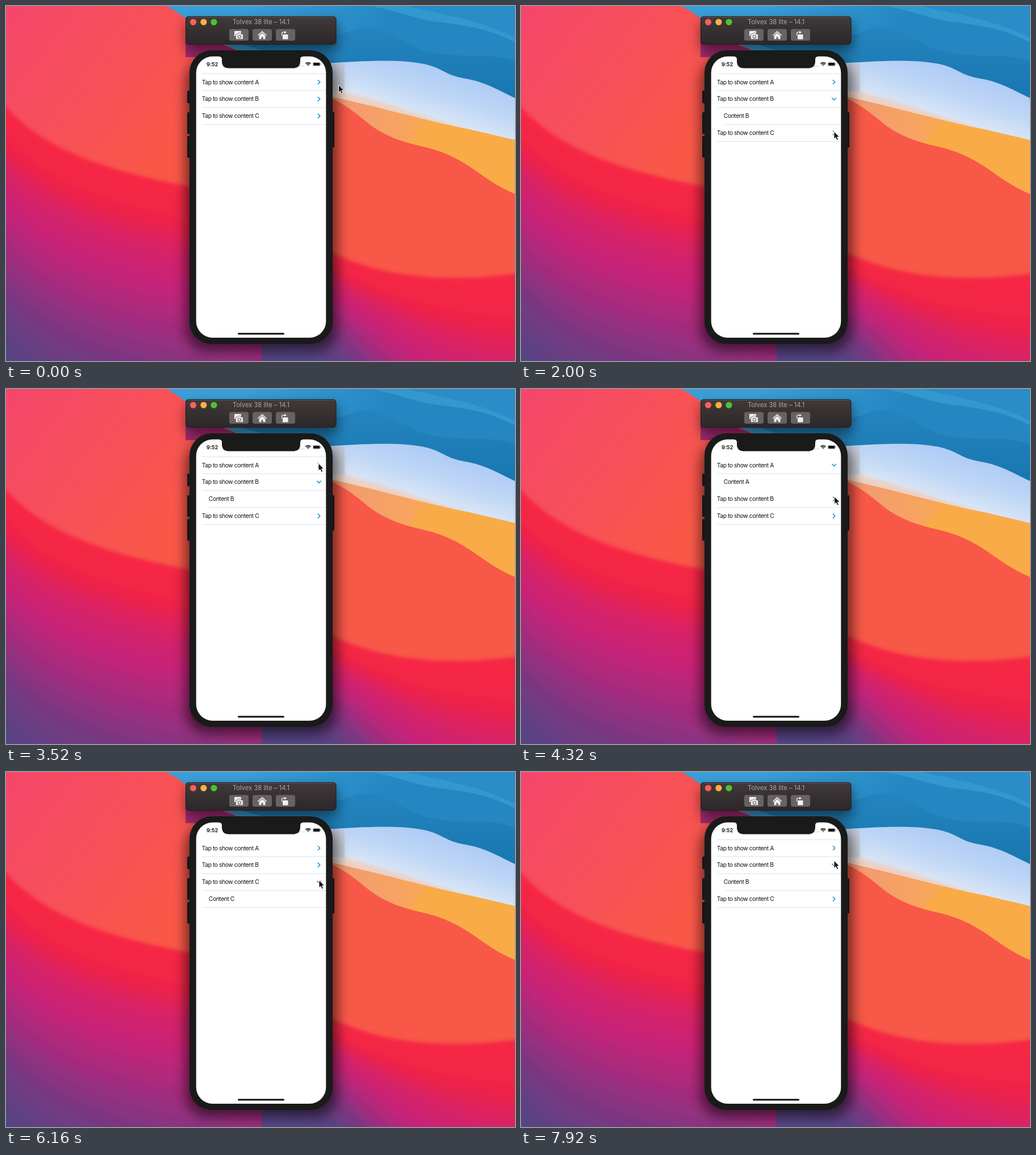
An HTML page that plays this animation: 896 by 625 pixels, repeating every 8000 ms.

```html
<!DOCTYPE html>
<html lang="en">
<head>
<meta charset="utf-8">
<title>Expandable list</title>
<style>
  html, body { margin: 0; width: 100%; height: 100%; overflow: hidden; background: #f85848; }
  svg { display: block; width: 896px; height: 625px; }
  text { font-family: Inter, Roboto, sans-serif; }
  .row { font-size: 10.3px; letter-spacing: -.42px; fill: #111; }
  .line { stroke: #d5e4ea; stroke-width: 1; }
  .chev { fill: none; stroke: #1c8cc8; stroke-width: 1.5; stroke-linecap: round; stroke-linejoin: round; }
</style>
</head>
<body>
<svg id="stage" viewBox="0 0 896 625" xmlns="http://www.w3.org/2000/svg">
  <defs>
    <linearGradient id="warm" x1="0" y1="0" x2="300" y2="230" gradientUnits="userSpaceOnUse">
      <stop offset="0" stop-color="#f5466b"/><stop offset=".5" stop-color="#f74f5b"/><stop offset="1" stop-color="#f95848"/>
    </linearGradient>
    <linearGradient id="sky" x1="420" y1="0" x2="620" y2="120" gradientUnits="userSpaceOnUse">
      <stop offset="0" stop-color="#3a9fd8"/><stop offset="1" stop-color="#2487c2"/>
    </linearGradient>
    <linearGradient id="deep" x1="0" y1="30" x2="0" y2="160" gradientUnits="userSpaceOnUse">
      <stop offset="0" stop-color="#2485c0"/><stop offset="1" stop-color="#1977b0"/>
    </linearGradient>
    <linearGradient id="mist" x1="700" y1="96" x2="670" y2="195" gradientUnits="userSpaceOnUse">
      <stop offset="0" stop-color="#b0cdf5"/><stop offset=".4" stop-color="#bfd6f6"/><stop offset="1" stop-color="#e6eef6"/>
    </linearGradient>
    <linearGradient id="sand" x1="590" y1="0" x2="760" y2="0" gradientUnits="userSpaceOnUse">
      <stop offset="0" stop-color="#f39a72"/><stop offset=".7" stop-color="#f7a55e"/><stop offset="1" stop-color="#f9ab48"/>
    </linearGradient>
    <linearGradient id="bar" x1="0" y1="18" x2="0" y2="68" gradientUnits="userSpaceOnUse">
      <stop offset="0" stop-color="#413a3b"/><stop offset=".4" stop-color="#383233"/><stop offset="1" stop-color="#2b2728"/>
    </linearGradient>
    <filter id="soft" x="-10%" y="-10%" width="120%" height="120%"><feGaussianBlur stdDeviation="3"/></filter>
    <filter id="shade" x="-30%" y="-30%" width="160%" height="160%"><feGaussianBlur stdDeviation="11"/></filter>
    <clipPath id="leftHalf"><rect width="450" height="625"/></clipPath>
    <clipPath id="rightHalf"><rect x="450" width="446" height="625"/></clipPath>
  </defs>

  <!-- wallpaper -->
  <rect width="896" height="625" fill="url(#warm)"/>
  <path d="M282 0C300 9 310 16 330 34C350 52 380 68 420 82C480 102 540 140 575 165L896 260V0Z" fill="url(#sky)"/>
  <path d="M316 20C336 42 360 62 402 76L420 90H316Z" fill="#a52a72"/>
  <path d="M390 60C470 74 560 62 610 42C660 26 690 62 730 76C790 97 850 78 896 98V175L575 115Z" fill="url(#deep)"/>
  <path d="M640 0C690 8 715 22 760 28C810 34 850 40 896 64V0Z" fill="#3398d0"/>
  <path d="M705 0C760 14 830 22 896 56V0Z" fill="#2a8dc8"/>
  <path d="M560 101C620 97 690 93 730 101C770 108 770 122 810 128C845 134 870 150 896 162V240L700 225L560 170Z" fill="url(#mist)"/>
  <path d="M575 101H596V152L575 150Z" fill="#c3c5cd" opacity=".7"/>
  <path d="M575 148C650 160 730 195 815 217L700 214L575 178Z" fill="#f2c9b4" opacity=".75" filter="url(#soft)"/>
  <path d="M575 160C650 176 730 200 815 217L896 236V340L700 270L575 200Z" fill="url(#sand)"/>
  <path d="M738 208L815 217L896 236V340L700 250Z" fill="#f9ab47"/>
  <path d="M560 158C590 168 610 184 632 202C665 230 700 240 740 249C815 268 835 306 896 331V625H560Z" fill="#f85848"/>
  <g clip-path="url(#leftHalf)"><g id="left" filter="url(#soft)"></g></g>
  <g clip-path="url(#rightHalf)"><g id="right" filter="url(#soft)"></g></g>

  <!-- shadows -->
  <g filter="url(#shade)">
    <rect x="316" y="92" width="268" height="516" rx="40" opacity=".55"/>
    <rect x="316" y="28" width="267" height="52" rx="6" opacity=".5"/>
  </g>

  <!-- simulator bar -->
  <rect x="316.5" y="18.5" width="264.5" height="49" rx="5" fill="url(#bar)" stroke="#211d1e"/>
  <path d="M321 19.5H577" stroke="#6a6263" stroke-width=".8"/>
  <circle cx="329.5" cy="28.3" r="5.6" fill="#fb5f57"/>
  <circle cx="347.9" cy="28.3" r="5.6" fill="#fdb040"/>
  <circle cx="366" cy="28.3" r="5.6" fill="#4fc22f"/>
  <text x="449" y="32.3" text-anchor="middle" font-size="11.2" fill="#aca6a6">Tolvex 38 lite – 14.1</text>
  <g fill="#686263">
    <rect x="393" y="40.5" width="34" height="20.5" rx="3.5"/>
    <rect x="434" y="40.5" width="34" height="20.5" rx="3.5"/>
    <rect x="475" y="40.5" width="34" height="20.5" rx="3.5"/>
  </g>
  <g fill="#f2f0f0">
    <rect x="402" y="44" width="12" height="9" rx="1.2"/>
    <path d="M404.5 49.5H407.5L408.7 47.6H413L414.2 49.5H417.3V58.5H404.5Z" stroke="#686263" stroke-width=".8"/>
    <circle cx="410.9" cy="53.9" r="2.7" fill="none" stroke="#686263" stroke-width="1.1"/>
    <path d="M443 51.3L451 44L459 51.3L458 52.4L451 46.2L444 52.4Z"/>
    <path d="M445.5 52.4L451 47.6L456.5 52.4V58.3H452.5V54.5H449.5V58.3H445.5Z"/>
    <rect x="487" y="50" width="9.5" height="8.5" rx="1"/>
    <path d="M485.5 52V49Q485.5 46.2 488.3 46.2H490.5" fill="none" stroke="#f2f0f0" stroke-width="1.2"/>
    <path d="M490 43.7L494 46.2L490 48.7Z"/>
  </g>

  <!-- phone -->
  <g fill="#161616">
    <rect x="319" y="149" width="6" height="22" rx="1.5"/>
    <rect x="319" y="187" width="6" height="38" rx="1.5"/>
    <rect x="319" y="229" width="6" height="38" rx="1.5"/>
    <rect x="573" y="187" width="5" height="62" rx="1.5"/>
    <rect x="323" y="78" width="252" height="517" rx="39" fill="#1a1a1a"/>
  </g>
  <rect x="334.7" y="88.7" width="228.6" height="495.3" rx="29" fill="#fff"/>
  <path d="M375 88H523V89Q518 89 518 94V97Q518 109.5 505.5 109.5H392.5Q380 109.5 380 97V94Q380 89 375 89Z" fill="#1a1a1a"/>
  <text x="353" y="105.8" font-size="9.4" font-weight="600" letter-spacing="-.1" fill="#111">9:52</text>
  <path d="M516 105.5H525" stroke="#aaa" stroke-width="1.2" stroke-dasharray="1.3 1.2"/>
  <g fill="none" stroke="#111" stroke-width="1.5">
    <path d="M527.4 101.3Q531.9 97.6 536.4 101.3"/>
    <path d="M529.2 103.1Q531.9 100.9 534.6 103.1"/>
  </g>
  <path d="M530.6 104.4Q531.9 103.4 533.2 104.4L531.9 105.9Z" fill="#111"/>
  <rect x="540.2" y="99.2" width="13" height="6.4" rx="1.8" fill="none" stroke="#999" stroke-width=".7"/>
  <rect x="541" y="100" width="11.4" height="4.8" rx="1.1" fill="#111"/>
  <path d="M554.3 101.3V103.5" stroke="#999"/>
  <rect x="408" y="575.4" width="82" height="3" rx="1.5" fill="#111"/>

  <g id="list"></g>
  <path id="cursor" d="M0 0V13.2L3 10.5L5.2 15.4L7.6 14.3L5.4 9.6H9.5Z" fill="#111" stroke="#fff" stroke-width=".9" stroke-linejoin="round"/>
</svg>
<script>
const LOOP = 8000, TICK = 80, PITCH = 29.85, TOP = 119.2, OPEN_MS = 300;
const $ = id => document.getElementById(id);

function add(parent, tag, attrs, text) {
  const el = document.createElementNS('http://www.w3.org/2000/svg', tag);
  for (const k in attrs) el.setAttribute(k, attrs[k]);
  if (text) el.textContent = text;
  parent.appendChild(el);
  return el;
}
const mix = (a, b, p) => a + (b - a) * p;
const ease = p => p * p * (3 - 2 * p);
const clamp = p => Math.max(0, Math.min(1, p));

// wallpaper bands, from red down to indigo
const shades = [
  [0, 246, 40, 68], [.13, 241, 36, 70], [.26, 214, 35, 104], [.4, 198, 36, 120],
  [.58, 160, 45, 126], [.76, 120, 56, 130], [1, 86, 68, 132]
];
function shade(t) {
  const i = Math.max(1, shades.findIndex(s => s[0] >= t));
  const a = shades[i - 1], b = shades[i], p = (t - a[0]) / (b[0] - a[0]);
  return `rgb(${[1, 2, 3].map(k => Math.round(mix(a[k], b[k], p)))})`;
}
const BANDS = 30;
for (let i = 0; i <= BANDS; i++) {
  const t = i / BANDS, fill = shade(t);
  let a = 180 + 420 * t, b = 320 + 440 * t;
  add($('left'), 'path', { fill,
    d: `M-30 ${a - 40}C30 ${a + 45} 110 ${mix(a, b, .6) + 15} 335 ${b}L480 ${b + 40}V720H-30Z` });
  a = 433 + 190 * t;
  b = 468 + 600 * t;
  add($('right'), 'path', { fill,
    d: `M430 ${a - 50}L570 ${a}C640 ${a + 32} 740 ${(a + b) / 2 + 45} 920 ${b}V720H430Z` });
}

// list rows
const list = $('list');
const line = x => add(list, 'path', { class: 'line', d: `M${x} 0H563` });
const topLine = line(345);
const rows = ['A', 'B', 'C'].map((name, i) => ({
  label: add(list, 'text', { class: 'row', x: 344.8 }, `Tap to show content ${name}`),
  body: add(list, 'text', { class: 'row', x: 356.8 }, `Content ${name}`),
  chev: add(list, 'path', { class: 'chev', d: 'M-1.7 -3.4L1.8 0L-1.7 3.4' }),
  rule: line(345),
  bodyRule: i ? line(i === 1 ? 357 : 345) : null
}));

// [time, row that opens]
const taps = [[640, 0], [1280, 1], [2000, 2], [2800, 1], [3600, 0], [4400, 1], [5040, 2], [7040, 1]];
// spans without the top line
const bare = [[640, 1280], [3600, 4400], [5840, 7040]];
// [time, x, y] of the pointer tip
const path = [
  [0, 585.5, 139], [480, 550, 131], [720, 550, 131], [1120, 551.7, 191], [1360, 551.7, 191],
  [1840, 551, 221], [2160, 551, 221], [2640, 550, 161.5], [2960, 550, 161.5],
  [3440, 550, 131], [3760, 550, 131], [4240, 551.7, 189.5], [4480, 551.7, 189.5],
  [4880, 551, 221], [5120, 551, 221], [5360, 549.8, 196.5], [5760, 551, 190.5],
  [6400, 551, 190.5], [6900, 551, 160], [7200, 551, 160], [7600, 551, 156], [8000, 551, 156]
];

function openness(t) {
  const open = [0, 0, 0];
  let last = -1;
  for (const [at, row] of taps) {
    if (t < at) break;
    const p = ease(clamp((t - at) / OPEN_MS));
    open.fill(0);
    if (last >= 0) open[last] = 1 - p;
    open[row] = p;
    last = row;
  }
  return open;
}

function draw(t) {
  const open = openness(t);
  const move = (el, x, y) => el.setAttribute('transform', `translate(${x} ${y})`);
  move(topLine, 0, TOP);
  topLine.setAttribute('opacity', bare.some(([a, b]) => t >= a && t < b) ? 0 : 1);
  let y = TOP;
  rows.forEach((r, i) => {
    const o = open[i], mid = y + PITCH / 2;
    move(r.label, 0, mid + 3.5);
    r.chev.setAttribute('transform', `translate(551 ${mid - .2}) rotate(${90 * o})`);
    move(r.rule, 0, y + PITCH);
    move(r.body, 0, mid + PITCH * o + 3.5);
    r.body.setAttribute('opacity', o * o);
    y += PITCH * (1 + o);
    if (r.bodyRule) {
      move(r.bodyRule, 0, y);
      r.bodyRule.setAttribute('opacity', o);
    }
  });
  const k = Math.max(1, path.findIndex(s => s[0] >= t));
  const a = path[k - 1], b = path[k], p = ease((t - a[0]) / (b[0] - a[0]));
  move($('cursor'), mix(a[1], b[1], p), mix(a[2], b[2], p));
}

const start = performance.now();
function frame(now) {
  const t = Math.max(0, now - start) % LOOP;
  draw(Math.floor(t / TICK) * TICK);
  requestAnimationFrame(frame);
}
draw(0);
requestAnimationFrame(frame);
</script>
</body>
</html>
```
